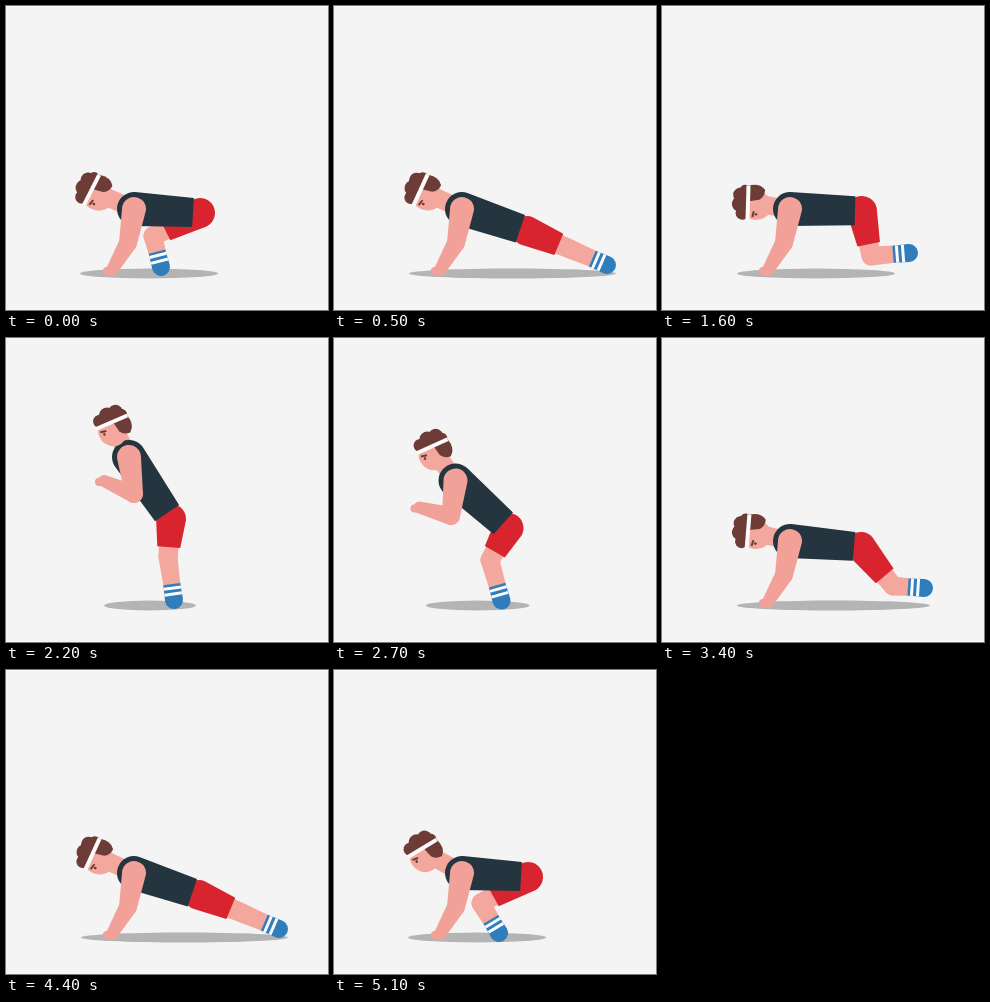
These frames come from a looping animation (322x304 px, 5.2 s). An HTML page with a canvas:

```html
<!DOCTYPE html>
<html>
<head>
<meta charset="utf-8">
<style>
html, body { margin: 0; overflow: hidden; background: #f4f4f4; }
canvas { display: block; }
</style>
</head>
<body>
<canvas width="322" height="304"></canvas>
<script>
const ctx = document.querySelector('canvas').getContext('2d');
const SKIN = '#f3a79d', ARM = '#f2a198', HAIR = '#6d3c36', SHIRT = '#24353f',
      RED = '#d8242e', BLUE = '#2f7dbd', WHITE = '#fbfbfb';

// Joint positions; head also carries its tilt in degrees.
const plank = { head: [90, 186, -62], shoulder: [128, 203], hip: [193, 225], knee: [236, 243],
                toe: [273, 259], elbow: [122, 237], hand: [106, 264], shadow: [75, 282] };
const down = { head: [79, 232, -75], shoulder: [113, 243], hip: [188, 250], knee: [225, 256],
               toe: [271, 259], elbow: [143, 252], hand: [105, 267], shadow: [55, 282] };
const extend = { ...plank, head: [90, 194, -82], hip: [199, 209], knee: [231, 248],
                 toe: [262, 250], shadow: [75, 268] };
const kneel = { ...plank, head: [90, 197, -85], hip: [200, 205], knee: [209, 250],
                toe: [247, 247], shadow: [75, 233] };
const tuck = { ...plank, head: [89, 186, -60], hip: [194, 207], knee: [147, 230],
               toe: [155, 261], shadow: [74, 212] };
const crouch = { ...tuck, head: [90, 182, -28], knee: [147, 233], toe: [165, 263] };
const squat = { head: [92, 136, -22], shoulder: [120, 166], hip: [184, 199], knee: [150, 225],
                toe: [167, 263], elbow: [106, 200], hand: [73, 196], shadow: [86, 201] };
const lean = { head: [107, 88, -20], shoulder: [123, 119], hip: [165, 181], knee: [162, 219],
               toe: [168, 262], elbow: [128, 156], hand: [98, 143], shadow: [98, 190] };
const jump = { head: [118, 54, -8], shoulder: [134, 86], hip: [152, 160], knee: [157, 202],
               toe: [162, 247], elbow: [137, 123], hand: [109, 110], shadow: [104, 184] };

const STEP = 100, STEPS = 52;
const keys = [
  [0, tuck], [2, kneel], [3, extend], [4.5, plank], [6, plank], [10, down], [13, plank],
  [14, plank], [15, extend], [16, kneel], [18, tuck], [19, crouch], [20.5, squat],
  [22, lean], [23, jump], [24, jump], [26, lean], [28, squat], [30, crouch], [31, tuck],
  [33, kneel], [34, extend], [35.5, plank], [36.5, plank], [40, down], [43, plank],
  [44, plank], [45, extend], [46, kneel], [48, tuck], [49.5, crouch], [51, crouch], [52, tuck]
];

const mix = (a, b, k) => a.map((v, i) => v + (b[i] - v) * k);
const toward = (a, b, d) => mix(a, b, d / Math.hypot(b[0] - a[0], b[1] - a[1]));

function poseAt(step) {
  const i = keys.findIndex(key => key[0] > step);
  const [t0, from] = keys[i - 1], [t1, to] = keys[i];
  const u = (step - t0) / (t1 - t0), k = u * u * (3 - 2 * u);
  return Object.fromEntries(Object.keys(from).map(j => [j, mix(from[j], to[j], k)]));
}

// Tapered capsule from a to b, optionally cut straight at b.
function limb([ax, ay], [bx, by], ra, rb, color, flat) {
  const dir = Math.atan2(by - ay, bx - ax), q = Math.PI / 2;
  ctx.beginPath();
  ctx.arc(ax, ay, ra, dir + q, dir + 3 * q);
  if (flat) {
    const nx = Math.sin(dir) * rb, ny = -Math.cos(dir) * rb;
    ctx.lineTo(bx + nx, by + ny);
    ctx.lineTo(bx - nx, by - ny);
  } else ctx.arc(bx, by, rb, dir - q, dir + q);
  ctx.fillStyle = color;
  ctx.fill();
}

function ellipse(x, y, rx, ry, color) {
  ctx.beginPath();
  ctx.ellipse(x, y, rx, ry, 0, 0, 7);
  ctx.fillStyle = color;
  ctx.fill();
}

function line(x0, y0, x1, y1, width, color) {
  ctx.beginPath();
  ctx.moveTo(x0, y0);
  ctx.lineTo(x1, y1);
  ctx.lineWidth = width;
  ctx.strokeStyle = color;
  ctx.stroke();
}

function drawLeg({ hip, knee, toe }) {
  limb(hip, knee, 11, 9.5, SKIN);
  limb(knee, toe, 9.5, 8, SKIN);
  limb(toe, toward(toe, knee, 16), 9, 8.5, BLUE, true);
  ctx.save();
  ctx.translate(...toe);
  ctx.rotate(Math.atan2(knee[1] - toe[1], knee[0] - toe[0]));
  for (const x of [6, 12]) line(x, -8.7, x, 8.7, 3, WHITE);
  ctx.restore();
  limb(hip, mix(hip, knee, 0.74), 15, 11.5, RED, true);
}

function drawHead([x, y, tilt]) {
  ctx.save();
  ctx.translate(x, y);
  ctx.rotate(tilt * Math.PI / 180);
  ellipse(-2, 4, 14.5, 16, SKIN);
  ctx.beginPath();
  ctx.moveTo(1, -5);
  ctx.lineTo(17, -5);
  ctx.quadraticCurveTo(21, 6, 14, 12);
  ctx.quadraticCurveTo(7, 12, 4, 7);
  ctx.closePath();
  ctx.fillStyle = HAIR;
  ctx.fill();
  for (const [hx, hy, r] of [[-11, -9, 6.5], [-2, -12, 8], [7, -12, 7.5], [12, -8, 5.5]])
    ellipse(hx, hy, r, r, HAIR);
  line(-17, -3, 17, -5, 4, WHITE);
  line(-14, 1.5, -8, 2.5, 2, HAIR);
  ellipse(-11, 5, 1.2, 1.5, HAIR);
  ctx.restore();
}

function drawArm({ shoulder, elbow, hand }) {
  limb(shoulder, elbow, 12, 9, ARM);
  limb(elbow, hand, 9, 6, ARM);
  limb(hand, [hand[0] - 5, hand[1] + 1], 5, 4, ARM);
}

function draw(step) {
  const pose = poseAt(step), { shoulder, hip, head, shadow: [x0, x1] } = pose;
  ctx.fillStyle = '#f4f4f4';
  ctx.fillRect(0, 0, 322, 304);
  ellipse((x0 + x1) / 2, 267.5, (x1 - x0) / 2, 5, '#b4b4b4');
  drawLeg(pose);
  limb(head, shoulder, 9, 9, SKIN);
  limb(shoulder, toward(hip, shoulder, 7), 17, 14.5, SHIRT, true);
  drawHead(head);
  drawArm(pose);
}

function tick() {
  draw(Math.floor(performance.now() / STEP) % STEPS);
  requestAnimationFrame(tick);
}
tick();
</script>
</body>
</html>
```
